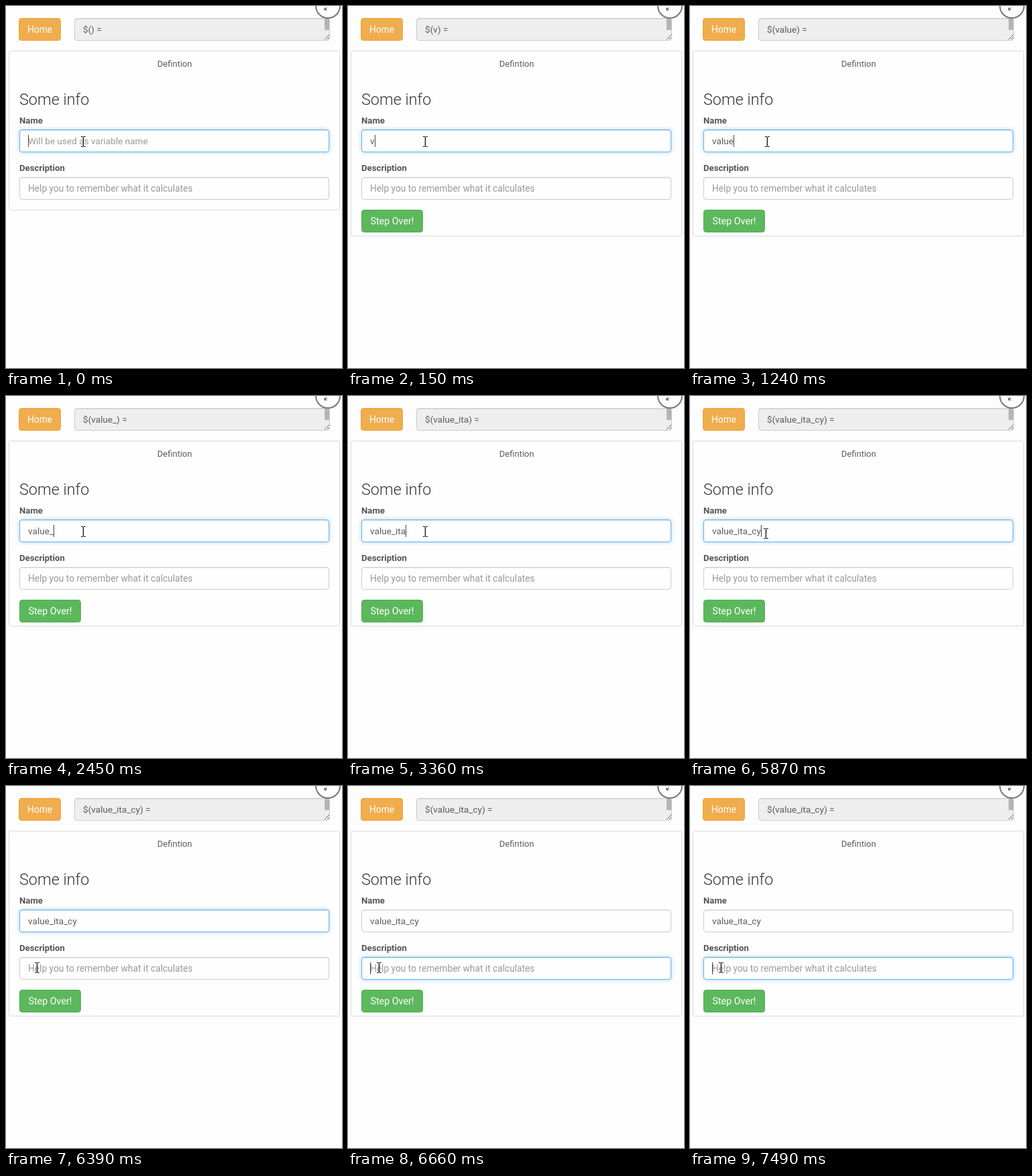
These frames come from a looping animation (502 px wide and 542 px high, 8 s). An HTML page:

```html
<!DOCTYPE html>
<html lang="en">
<head>
<meta charset="utf-8">
<title>Definition form</title>
<style>
html, body { margin: 0; width: 100%; height: 100%; overflow: hidden; background: #fdfdfd; }
#stage { position: relative; width: 502px; height: 542px; overflow: hidden; }
#stage div, svg { position: absolute; box-sizing: border-box; }
#stage div { border: 1px solid #ccc; border-radius: 4px; }
#stage .panel { left: 4px; top: 67px; width: 495px; height: 278px; border-color: #dadada; border-radius: 3px; background: #fefefe; }
#stage .home { left: 19px; top: 18px; width: 63px; height: 34px; background: #f0ad4e; border-color: #eea236; }
#stage .formula { left: 102px; top: 18px; width: 382px; height: 34px; background: #eee; box-shadow: inset 0 1px 1px rgba(0,0,0,.075); }
#stage .thumb { left: 476px; top: 19px; width: 7px; height: 17px; background: #b4b4b4; border: 0; border-radius: 1px; }
#stage .field { left: 20px; width: 463px; height: 34px; background: #fefefe; box-shadow: inset 0 1px 1px rgba(0,0,0,.075); }
#stage .focus { border-color: #66afe9; box-shadow: inset 0 1px 1px rgba(0,0,0,.075), 0 0 6px rgba(102,175,233,.55); }
#stage .step { left: 20px; top: 305px; width: 92px; height: 34px; background: #5cb85c; border-color: #4cae4c; }
svg { left: 0; top: 0; }
text { font: 13.6px Roboto, sans-serif; fill: #5c5c5c; white-space: pre; }
.title { font-size: 23.4px; font-weight: 300; fill: #333; }
.hint { fill: #999; }
.label { font-size: 13.2px; font-weight: 700; fill: #555; }
.button { fill: #fff; text-anchor: middle; }
</style>
</head>
<body>
<div id="stage">
  <div class="panel" id="panel"></div>
  <div class="home"></div>
  <div class="formula"></div>
  <div class="thumb"></div>
  <div class="field" id="nameBox" style="top:185px"></div>
  <div class="field" id="descBox" style="top:256px"></div>
  <div class="step" id="stepBox"></div>
  <svg width="502" height="542">
    <circle cx="481" cy="0" r="18" fill="#fefefe" stroke="#777" stroke-width="2"/>
    <path d="M476 2.5V6H479.5M476.3 5.7L479.5 2.5" fill="none" stroke="#555" stroke-width="1.2"/>
    <path d="M476 50L483 43M480 50L483 47" stroke="#666"/>
    <text class="button" x="50.5" y="40" style="font-size:13.8px">Home</text>
    <text id="formula" x="115" y="40"></text>
    <text x="252" y="91" text-anchor="middle" style="font-size:13px">Defintion</text>
    <text class="title" x="20" y="148">Some info</text>
    <text class="label" x="20" y="176">Name</text>
    <text id="name" x="33" y="207"></text>
    <text class="label" x="20" y="247">Description</text>
    <text class="hint" x="33" y="278" style="font-size:13.75px">Help you to remember what it calculates</text>
    <text class="button" id="stepText" x="66" y="327" style="font-size:14.3px">Step Over!</text>
    <rect id="caret" width="1" height="18" fill="#444"/>
    <g id="mouse" fill="none">
      <path d="M.5 -7V7" stroke="#fff" stroke-width="3" opacity=".5"/>
      <path d="M-3 -7.5H0M1 -7.5H4M-3 7.5H0M1 7.5H4" stroke="#111"/>
      <path d="M.5 -7V7" stroke="#111" stroke-width="1.4"/>
    </g>
  </svg>
</div>
<script>
const LOOP = 8000, BLINK = 523;
const WORD = "value_ita_cy";
const PRESS = 6660, RELEASE = 6820;
const MOVE = 5870, MOVE_STEP = 130, MOVE_END = MOVE + 4 * MOVE_STEP;

// one keystroke per letter of WORD
const keys = [150, 300, 550, 830, 1240, 2450, 2830, 3080, 3360, 3910, 4690, 4820];
// the caret shows again after every input, then blinks
const inputs = [0, ...keys, PRESS, RELEASE, 7490];

const $ = id => document.getElementById(id);
const show = (id, on) => $(id).style.visibility = on ? "visible" : "hidden";
const ease = (t, from, to) => {
  const u = Math.min(1, Math.max(0, (t - from) / (to - from)));
  return u * u * (3 - 2 * u);
};

function mouseAt(t) {
  if (t < MOVE) return [115, 203];
  const s = MOVE + Math.floor((t - MOVE) / MOVE_STEP) * MOVE_STEP;
  const x = 115 - 69 * ease(s, MOVE - 40, MOVE_END - MOVE_STEP);
  const y = 203 + 69 * ease(s, MOVE - 70, MOVE_END);
  return [Math.round(x), Math.round(y)];
}

function draw(t) {
  const typed = WORD.slice(0, keys.filter(k => k <= t).length);
  const onDesc = t >= PRESS;
  const name = $("name"), caret = $("caret");

  $("formula").textContent = `$(${typed}) =`;
  name.textContent = typed || "Will be used as variable name";
  name.setAttribute("class", typed ? "" : "hint");
  $("panel").style.height = (typed ? 278 : 239) + "px";
  show("stepBox", typed);
  show("stepText", typed);

  $("nameBox").classList.toggle("focus", !onDesc);
  $("descBox").classList.toggle("focus", onDesc);

  const width = typed && !onDesc ? name.getComputedTextLength() : 0;
  caret.setAttribute("x", Math.round(33 + width));
  caret.setAttribute("y", onDesc ? 264 : 193);
  const idle = t - inputs.findLast(i => i <= t);
  show("caret", Math.floor(idle / BLINK) % 2 === 0);
  $("mouse").setAttribute("transform", `translate(${mouseAt(t)})`);
}

const start = performance.now();
function tick() {
  draw((performance.now() - start) % LOOP);
  requestAnimationFrame(tick);
}
tick();
</script>
</body>
</html>
```
